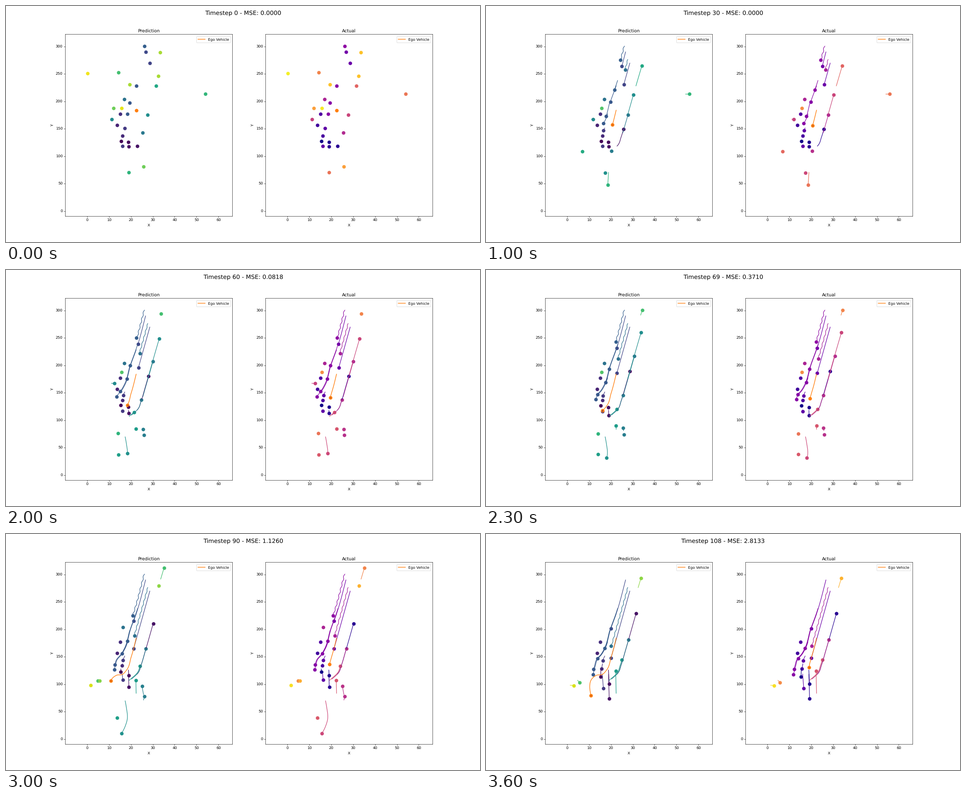
Write a matplotlib script that moves like this. It is 1058 px wide and 529 px high and loops after 3700 ms.

```python
import numpy as np
import matplotlib.pyplot as plt
from matplotlib.animation import FuncAnimation

plt.rcParams["text.hinting"] = "none"
plt.rcParams["font.size"] = 10.1

FRAMES = 37
LAST = FRAMES - 1
STEP = 3                      # timesteps per frame
ORANGE = "tab:orange"


def smooth(t, times, vals):
    """Cubic Hermite curve through (times, vals)."""
    times, vals = np.array(times, float), np.array(vals, float)
    slope = np.gradient(vals, times)
    i = np.clip(np.searchsorted(times, t, "right") - 1, 0, len(times) - 2)
    h = times[i + 1] - times[i]
    u = (t - times[i]) / h
    return (vals[i] * (1 + 2 * u) * (1 - u) ** 2 + slope[i] * h * u * (1 - u) ** 2
            + vals[i + 1] * u * u * (3 - 2 * u) + slope[i + 1] * h * u * u * (u - 1))


def lane(*points):
    """Road centre line: x as a function of y, both in stage pixels."""
    ys, xs = zip(*points)
    return lambda y: smooth(y, ys, xs)


south = lane((90, 315), (179, 290.5), (212, 278.5), (258, 264.5), (270, 257.5),
             (281, 248), (295, 243.5), (315, 238.5))
inner = lane((128, 321), (278, 279))
north = lane((70, 367), (178, 335), (262, 311), (294, 301.5), (311, 295), (328, 277))
exit_road = lane((374, 266), (388, 268.5), (416, 270.5), (431, 266), (458, 252))


class Track:
    """A vehicle seen from frame first to frame last; path maps frames to pixels."""

    def __init__(self, value, path, first=0, last=LAST):
        self.value, self.first, self.last = value, first, last
        x, y = path(np.arange(first * STEP, last * STEP + 1) / STEP)
        self.x = (x - 181.5) / 4.886 + 0.1
        self.y = (459.6 - y) / 1.23

    def until(self, k):
        if not self.first <= k <= self.last:
            return [], []
        n = (k - self.first) * STEP + 1
        return self.x[:n], self.y[:n]


tracks = []


def ride(value, road, y0, y1, first=0, last=LAST, bend=0, dx=0, wobble=0):
    """Follow a road from y0 to y1; a positive bend slows down on the way."""
    def path(k):
        s = (k - first) / (last - first)
        y = y0 + (y1 - y0) * (s + bend * s * (1 - s))
        return road(y) + dx + wobble * np.sin((y - 98.5) * 2 * np.pi / 14), y
    tracks.append(Track(value, path, first, last))


def drift(value, start, end=None, first=0, last=LAST, power=1):
    """Straight move; a high power means waiting first, then pulling away."""
    (x0, y0), (x1, y1) = start, end or start

    def path(k):
        s = ((k - first) / (last - first)) ** power
        return x0 + (x1 - x0) * s, y0 + (y1 - y0) * s
    tracks.append(Track(value, path, first, last))


def keyed(*keys):
    times, xs, ys = zip(*keys)
    return lambda k: (smooth(k, times, xs), smooth(k, times, ys))


# southbound traffic
ride(.30, south, 90, 192, last=33, dx=-6.5, wobble=1)
ride(.22, south, 103, 212, bend=.08)
ride(.27, south, 179, 279, bend=.4)
ride(.30, south, 167, 256, first=2, dx=-.7)
ride(.27, south, 217, 303, bend=.35, dx=-1)
ride(.28, south, 242, 315, bend=.08, dx=.6)
ride(.20, inner, 128, 278, bend=.2)
ride(.37, inner, 120, 251, first=5, bend=.1, dx=-6.7, wobble=.8)
ride(.50, exit_road, 374, 458, first=10, last=33)

# northbound traffic
ride(.05, north, 314, 178)
ride(.40, north, 284, 173, last=28, dx=.7)
ride(.49, north, 243.5, 140, last=23)
ride(.60, north, 179, 103, last=17)
ride(.42, north, 325, 237, first=10)
ride(.54, north, 328, 282, first=16, dx=-2)
ride(.87, north, 157, 115, last=9, dx=-1)
ride(.87, north, 104, 83, last=9, dx=-12.5)
ride(.70, north, 101, 72, first=19, last=33, bend=.5, dx=-12.5)
ride(.83, north, 120, 99, first=29, bend=.4, dx=-12.5)

# queue that pulls away late
drift(.12, (260, 291), (258, 302), power=5)
drift(.01, (256.5, 302.5), (256, 319.5), power=5)
drift(.17, (259.5, 314), (262, 346), power=5)
drift(.03, (273.3, 305), (275, 336), power=5)
drift(.05, (273.5, 314.5), (275, 369), power=3.5)
drift(.38, (264, 209), (258, 208), last=33, power=8)
drift(.43, (307, 360), (302, 333), first=11, last=33, power=2.5)
drift(.42, (307, 372), (310, 361), first=11, last=33, power=2)
drift(.55, (290.5, 357), (289.5, 307), first=19, power=1.25)

# parked or nearly still
drift(.17, (265, 273.5), (260.5, 283.5), power=.45)
drift(.14, (255, 242))
drift(.10, (248, 266.5))
drift(.78, (240, 228.5), (238.5, 234), last=9)
drift(.96, (257.7, 228.5), last=9)
drift(.98, (182, 151), (183, 151), last=9)
drift(.70, (251, 148.5), (255, 149), last=9)
drift(.87, (276, 176), (273, 175), last=9)
drift(.78, (307, 360), (308, 360), last=9)
drift(.66, (445, 197), (456, 197), last=12)
drift(.65, (273.5, 373), (271, 415), last=15)
drift(.48, (235.5, 254), (243, 254.5), last=22, power=.8)
drift(.61, (215.5, 326), (214.5, 326), first=5, last=17)
drift(1.0, (218, 329), first=4, last=9)
drift(.73, (257.5, 228.5), first=10, last=23)
drift(.65, (250, 365.5), (249.5, 368), first=17, last=28)
drift(.56, (251.5, 414.5), (247.5, 411), first=17, last=33)
drift(.92, (241, 251), first=24, last=28)
drift(.72, (204.5, 328), (208.5, 332.5), first=29)
drift(.82, (208.5, 329), first=29, last=32)
drift(.94, (188, 339), (195.5, 339.5), first=29)

ego_pred = Track(0, keyed((0, 290.5, 233.5), (6, 285, 256), (14, 279, 277),
                          (20, 270.5, 303), (23, 260, 314.5), (26, 247, 316.5),
                          (30, 234, 328.5), (33, 231.5, 343), (36, 234, 362)))
ego_real = Track(0, keyed((0, 290.5, 233.5), (6, 285, 256), (14, 279, 277),
                          (20, 276.5, 286), (30, 275, 292), (36, 274, 299)))


class Panel:
    def __init__(self, ax, title, cmap, ego):
        ax.set(title=title, xlabel="X", ylabel="Y",
               xlim=(-9.98, 66.3), ylim=(-9.1, 322.05))
        self.items = [(tr, *self.pair(ax, cmap(tr.value), 1 + tr.value / 100))
                      for tr in tracks]
        self.items.append((ego, *self.pair(ax, ORANGE, 1.5, lw=1.7, label="Ego Vehicle")))
        self.ego = ego
        self.core, = ax.plot([], [], "o", ms=1.7, mew=0, color=cmap(0.), zorder=4)
        ax.legend(loc="upper right", fontsize=10)

    @staticmethod
    def pair(ax, color, z, **kw):
        line, = ax.plot([], [], color=color, zorder=1 + z, **kw)
        dot, = ax.plot([], [], "o", ms=9.8, mew=0, color=color, zorder=z)
        return line, dot

    def update(self, k):
        for track, line, dot in self.items:
            x, y = track.until(k)
            line.set_data(x, y)
            dot.set_data(x[-1:], y[-1:])
        # dark centre shows only while the ego vehicle moves briskly
        x, y = self.ego.until(k)
        self.core.set_data(x[-1:], y[-1:])
        self.core.set_visible(k > 0 and y[-STEP - 1] - y[-1] > .9)


fig, (left, right) = plt.subplots(1, 2, figsize=(18, 9), dpi=58.7778)
heading = fig.suptitle("", fontsize=16.2)
panels = [Panel(left, "Prediction", plt.cm.viridis, ego_pred),
          Panel(right, "Actual", plt.cm.plasma, ego_real)]


def draw(k):
    step = k * STEP
    mse = np.interp(step, (48, 60, 78, 90, 108), (0, .0818, .6602, 1.1260, 2.8133))
    heading.set_text(f"Timestep {step} - MSE: {mse:.4f}")
    for panel in panels:
        panel.update(k)


anim = FuncAnimation(fig, draw, frames=FRAMES, interval=100, init_func=lambda: draw(0),
                     repeat=True, repeat_delay=0)
plt.show()
```
